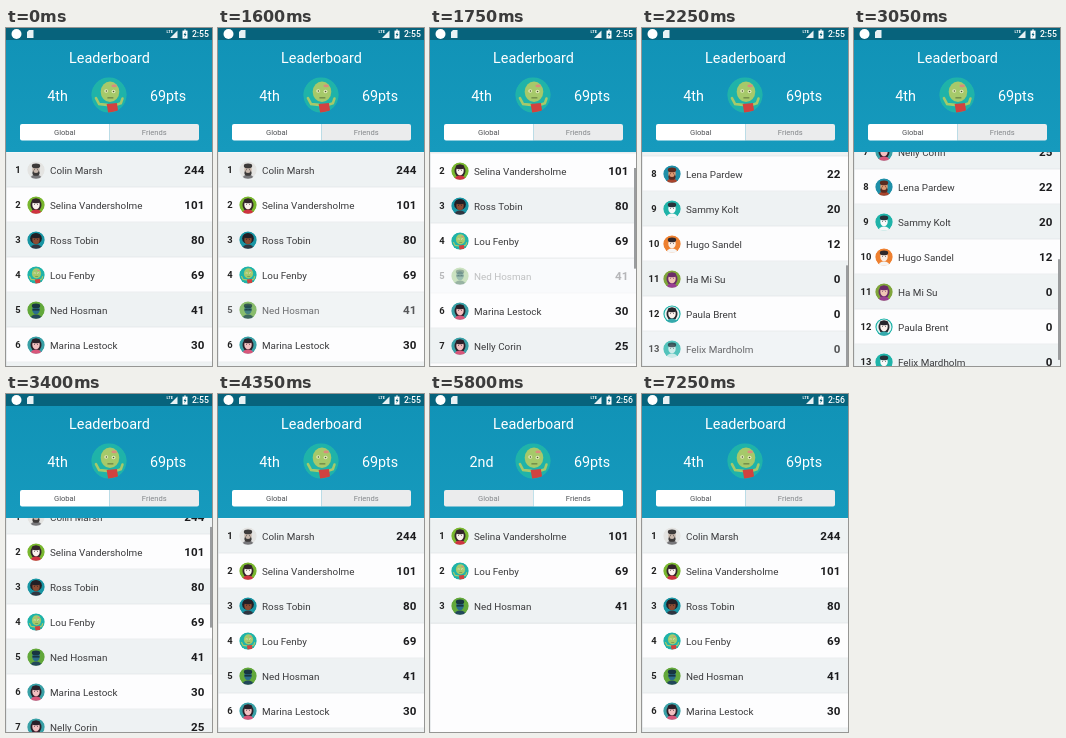
These frames come from a looping animation (206x338 px, 8 s). An HTML page with a canvas:

```html
<!DOCTYPE html>
<html lang="en">
<head>
<meta charset="utf-8">
<title>Leaderboard</title>
<style>
  html, body { margin: 0; width: 100%; height: 100%; overflow: hidden; background: #fff; }
  canvas { display: block; width: 100vw; height: 100vh; }
</style>
</head>
<body>
<canvas id="stage"></canvas>
<script>
const W = 206, H = 338, LOOP = 8000, TICK = 50;
const LIST_TOP = 124, ROW = 35, TEAL = '#1fb3a9';
const canvas = document.getElementById('stage');
const ctx = canvas.getContext('2d');

// look: background, skin, hair, shirt, hair style
const players = [
  ['Colin Marsh', 244, ['#e4e4e2', '#c9b8ac', '#3d3a39', '#77777a', 'beard']],
  ['Selina Vandersholme', 101, ['#79b72f', '#fbf3ee', '#33252a', '#cf3341', 'long']],
  ['Ross Tobin', 80, ['#1895a3', '#8a4b32', '#211f25', '#303641', 'afro']],
  ['Lou Fenby', 69, 'zombie'],
  ['Ned Hosman', 41, ['#62a83a', '#2b6d8c', '#173642', '#22485a', 'mask']],
  ['Marina Lestock', 30, ['#39a0a6', '#f3bfc0', '#2b2029', '#d8567a', 'long']],
  ['Nelly Corin', 25, ['#39a0a6', '#f3bfc0', '#2b2029', '#d8567a', 'long']],
  ['Lena Pardew', 22, ['#1f8fa8', '#dd9a73', '#5b2b20', '#a8442c', 'beard']],
  ['Sammy Kolt', 20, [TEAL, '#fafafa', '#26323a', '#f4f7f7', 'short']],
  ['Hugo Sandel', 12, ['#ee8030', '#fbeee6', '#30282b', '#f5f5f5', 'short']],
  ['Ha Mi Su', 0, ['#7fa53a', '#f0c6b4', '#6b2c68', '#9a3e93', 'long']],
  ['Paula Brent', 0, ['#e9f5f4', '#fdf3ee', '#27262c', '#35a9ac', 'long', TEAL]],
  ['Felix Mardholm', 0, [TEAL, '#fafafa', '#26323a', '#f4f7f7', 'short']]
];
const friends = [1, 3, 4].map(i => players[i]);

// [time, value] tracks
const scrollTrack = [
  [1600, 0], [1650, 4], [1700, 15], [1750, 34], [1850, 102], [1950, 162], [2050, 205],
  [2150, 231], [2250, 241], [3000, 241], [3050, 228], [3100, 192], [3200, 91], [3250, 63],
  [3300, 43], [3400, 19], [3500, 8], [3600, 3], [3750, 0]
];
const barTrack = [
  [1600, 0], [1650, 1], [2400, 1], [2650, 0], [3000, 0], [3050, 1], [3900, 1], [4050, 0]
];
const pressTracks = {
  4: [[1550, 1], [1650, .45], [1700, .3], [1750, .3], [1900, 1]],
  12: [[2150, .7], [2350, .8], [2550, 1]]
};

function sample(track, t) {
  const i = track.findIndex(key => key[0] > t);
  if (i === 0) return track[0][1];
  if (i < 0) return track[track.length - 1][1];
  const [t0, a] = track[i - 1], [t1, b] = track[i];
  return a + (b - a) * (t - t0) / (t1 - t0);
}

function rect(x, y, w, h, color) {
  ctx.fillStyle = color;
  ctx.fillRect(x, y, w, h);
}

function oval(x, y, rx, ry, color) {
  ctx.fillStyle = color;
  ctx.beginPath();
  ctx.ellipse(x, y, rx, ry, 0, 0, Math.PI * 2);
  ctx.fill();
}

function shape(points, color) {
  ctx.fillStyle = color;
  ctx.beginPath();
  points.forEach(p => ctx.lineTo(...p));
  ctx.fill();
}

function text(str, x, y, size, color, weight = 400, align = 'left') {
  ctx.font = `${weight} ${size}px Roboto, sans-serif`;
  ctx.textAlign = align;
  ctx.fillStyle = color;
  ctx.fillText(str, x, y);
}

function zombie() {
  const skin = '#a6c96a';
  oval(0, 0, 9, 9, TEAL);
  ctx.strokeStyle = skin;
  ctx.lineWidth = 1.3;
  ctx.lineCap = 'round';
  ctx.beginPath();
  ctx.moveTo(-1, 5); ctx.lineTo(-5, 4.6); ctx.lineTo(-6.6, 1.6);
  ctx.moveTo(3.6, 5); ctx.lineTo(6, 4.2); ctx.lineTo(6.8, 1.8);
  ctx.stroke();
  shape([[-1.2, 4.6], [4, 4], [4.6, 8], [-.4, 9]], '#d2423f');
  oval(.5, -1.6, 4.7, 5.2, skin);
  oval(2.6, -4.6, 1.4, .7, '#d98d7c');
  oval(-1.4, -2, 1, .9, '#e4ecbb');
  oval(2.3, -1.8, 1, .9, '#e4ecbb');
  oval(-1.3, -2, .4, .4, '#47562f');
  oval(2.3, -1.8, .4, .4, '#47562f');
  rect(-.8, 1.2, 3, .5, '#58703a');
}

function person([back, skin, hair, shirt, style, ring]) {
  oval(0, 0, 9, 9, ring || back);
  if (ring) oval(0, 0, 7.6, 7.6, back);
  if (style === 'long') oval(0, 0, 5.6, 6.6, hair);
  if (style === 'afro') oval(0, -1.6, 6, 5.6, hair);
  oval(0, 8.6, 5.8, 4, shirt);
  oval(0, -.2, 3.8, 4.6, skin);
  if (style === 'beard') {
    oval(0, 3, 3.7, 3, hair);
    oval(0, 1.4, 2.6, 1.6, skin);
  }
  if (style === 'mask') rect(-3.6, -1.2, 7.2, 1.8, hair);
  oval(0, -4.2, 4.3, 2.4, hair);
  oval(-1.4, -.4, .5, .5, hair);
  oval(1.4, -.4, .5, .5, hair);
}

function avatar(look, x, y, radius) {
  ctx.save();
  ctx.translate(x, y);
  ctx.scale(radius / 9, radius / 9);
  ctx.beginPath();
  ctx.arc(0, 0, 9, 0, Math.PI * 2);
  ctx.clip();
  look === 'zombie' ? zombie() : person(look);
  ctx.restore();
}

function row([name, score, look], index, scroll, opacity) {
  const top = LIST_TOP + .5 + index * ROW - scroll, mid = top + 17.5;
  if (top > H || top + ROW < LIST_TOP) return;
  ctx.globalAlpha = opacity;
  rect(0, top, W, ROW, index % 2 ? '#fdfdfe' : '#eef2f3');
  rect(0, top + ROW - .8, W, .8, '#dde1e3');
  text(index + 1, 12, mid + 3.4, 9.4, '#222', 700, 'center');
  avatar(look, 30, mid, 8.8);
  text(name, 44, mid + 3.8, 9.85, '#3a3a3c');
  text(score, 198.3, mid + 4.2, 11.6, '#1c1c1e', 700, 'right');
  ctx.globalAlpha = 1;
}

function list(t, onFriends) {
  const scroll = sample(scrollTrack, t);
  rect(0, LIST_TOP, W, H - LIST_TOP, '#fdfdfe');
  (onFriends ? friends : players).forEach((player, i) => {
    const press = !onFriends && pressTracks[i];
    row(player, i, scroll, press ? sample(press, t) : 1);
  });
  rect(0, LIST_TOP, .6, H - LIST_TOP, '#dde1e3');
  const view = H - LIST_TOP, content = players.length * ROW;
  ctx.globalAlpha = sample(barTrack, t);
  rect(204, LIST_TOP + scroll * view / content, 2, view * view / content, '#9a9c9e');
  ctx.globalAlpha = 1;
}

function statusBar(t) {
  rect(0, 0, W, 12, '#07637c');
  oval(10.5, 6, 5, 5, '#fff');
  shape([[21, 4], [23, 2], [27.5, 2], [27.5, 10], [21, 10]], '#e8f1f4');
  text('LTE', 160.5, 5.4, 4, '#fff', 700);
  shape([[164, 10], [171.5, 2.5], [171.5, 10]], '#e8f1f4');
  rect(176.5, 2.6, 5, 8, '#fff');
  rect(178, 1.6, 2, 1, '#fff');
  shape([[179.6, 3.8], [177.6, 7], [178.8, 7], [178.4, 9.4], [180.5, 6], [179.3, 6]], '#07637c');
  text(t < 5800 ? '2:55' : '2:56', 203, 9.2, 8.7, '#fff', 500, 'right');
}

function tab(label, x, radii, active) {
  ctx.fillStyle = active ? '#fff' : '#ebeced';
  ctx.beginPath();
  ctx.roundRect(x, 96, 89.5, 16.5, radii);
  ctx.fill();
  text(label, x + 44.75, 107, 7.6, active ? '#505356' : '#85888b', 400, 'center');
}

function header(onFriends) {
  const fill = ctx.createLinearGradient(0, 12, 0, LIST_TOP);
  fill.addColorStop(0, '#1193b7');
  fill.addColorStop(1, '#169abd');
  rect(0, 12, W, LIST_TOP - 12, fill);
  text('Leaderboard', 103.5, 34.5, 14.4, '#fff', 400, 'center');
  text(onFriends ? '2nd' : '4th', 51.5, 73, 14.3, '#fff', 400, 'center');
  text('69pts', 162, 73, 14.3, '#fff', 400, 'center');
  avatar('zombie', 103, 67, 17.8);
  tab('Global', 14, [2, 0, 0, 2], !onFriends);
  tab('Friends', 103.5, [0, 2, 2, 0], onFriends);
}

function draw() {
  const scale = devicePixelRatio || 1;
  const w = Math.round(innerWidth * scale), h = Math.round(innerHeight * scale);
  if (canvas.width !== w || canvas.height !== h) {
    canvas.width = w;
    canvas.height = h;
  }
  ctx.setTransform(w / W, 0, 0, h / H, 0, 0);
  const t = Math.floor((performance.now() - start) % LOOP / TICK) * TICK;
  const onFriends = t >= 4850 && t < 7250;
  list(t, onFriends);
  header(onFriends);
  statusBar(t);
  requestAnimationFrame(draw);
}

const start = performance.now();
draw();
</script>
</body>
</html>
```
